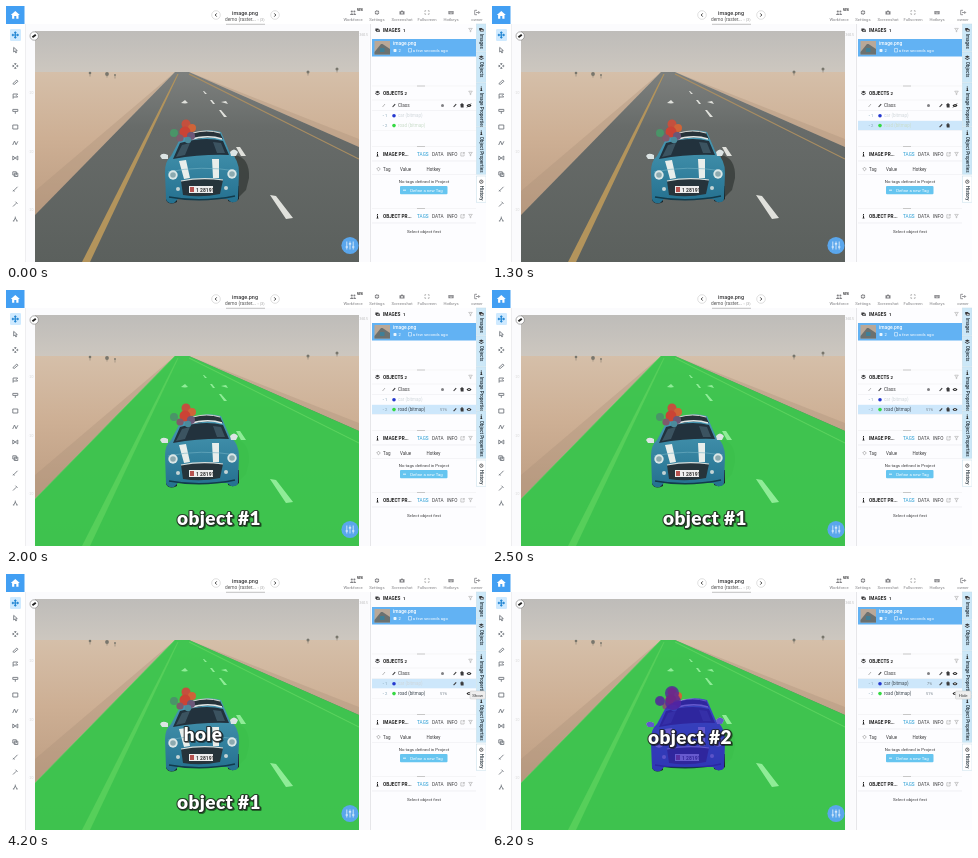
Write an HTML page that moves like this. It is 480x256 px and loops after 6.3 s.

```html
<!DOCTYPE html>
<html lang="en">
<head>
<meta charset="utf-8">
<title>Bitmap labeling</title>
<style>
  html, body { margin: 0; width: 100%; height: 100%; overflow: hidden; background: #fff; }
  svg { display: block; width: 100%; height: 100%; }
  text { font-family: Roboto, Arial, sans-serif; }
  .label { font: 900 19px Lato, "Open Sans", sans-serif; letter-spacing: .4px; fill: #fff; stroke: #222c; stroke-width: 2.2px;
    paint-order: stroke; stroke-linejoin: round; text-anchor: middle; filter: drop-shadow(1px 1.5px .7px #0009); }
</style>
</head>
<body>
<svg id="stage" viewBox="0 0 480 256" preserveAspectRatio="none">
  <defs>
    <linearGradient id="sky" x2="0" y2="1"><stop stop-color="#bebcb9"/><stop offset="1" stop-color="#cec8c0"/></linearGradient>
    <linearGradient id="sand" x2="0" y2="1"><stop stop-color="#d5bfa9"/><stop offset=".35" stop-color="#cdaf94"/><stop offset="1" stop-color="#b29176"/></linearGradient>
    <linearGradient id="asphalt" x2="0" y2="1"><stop stop-color="#7d807e"/><stop offset=".3" stop-color="#676b69"/><stop offset="1" stop-color="#5b605d"/></linearGradient>
    <linearGradient id="paint" x2="0" y2="1"><stop stop-color="#4b9bb5"/><stop offset="1" stop-color="#24708f"/></linearGradient>
    <clipPath id="frame"><path d="M29 25H353V256H29Z"/></clipPath>
    <path id="roadShape" d="M169 66H183L353 141V256H29V209Z"/>
    <path id="carShape" d="M187 127Q201 122 215 126L224 147Q233 153 233 167L232 193Q231 197 225 196L221 193H172L168 197Q161 198 160 193L159 166Q159 155 165 150L173 135Q178 128 187 127Z"/>
    <path id="mirrors" d="M154 150Q156 146 162 149V153H156ZM224 146Q228 141 232 146L230 150H225Z"/>
  </defs>
</svg>
<script>
const LOOP = 6300;
const stage = document.getElementById('stage');
const BLUE = '#429ff3', INK = '#3a3a3c', GRAY = '#808084', HOVER = '#cde7fb';

const attrs = o => Object.entries(o).map(([k, v]) => ` ${k}="${v}"`).join('');
const rect = (x, y, width, height, fill, more = {}) => `<rect${attrs({x, y, width, height, fill, ...more})}/>`;
const dot = (cx, cy, r, fill, more = {}) => `<circle${attrs({cx, cy, r, fill, ...more})}/>`;
const shape = (d, fill, more = {}) => `<path${attrs({d, fill, ...more})}/>`;
const line = (d, stroke = INK, width = .8) => shape(d, 'none', {stroke, 'stroke-width': width});
const text = (s, x, y, size = 4.5, fill = INK, more = {}) =>
  `<text${attrs({x, y, 'font-size': size, fill, ...more})}>${s}</text>`;
const at = (x, y, body) => `<g transform="translate(${x} ${y})">${body}</g>`;
const use = (id, more = {}) => `<use${attrs({href: '#' + id, ...more})}/>`;
const MID = {'text-anchor': 'middle'}, BOLD = {'font-weight': 700};

// Visible spans in ms; parts outside their spans are hidden.
const ROAD_ON = 1400, CAR_ON = 5300;
const SPANS = {
  roadMask: [[ROAD_ON, LOOP]], carMask: [[CAR_ON, LOOP]],
  roadPale: [[0, ROAD_ON]], roadOn: [[ROAD_ON, LOOP]],
  carPale: [[0, CAR_ON]], carOn: [[CAR_ON, LOOP]],
  roadHover: [[400, 3700]], carHover: [[3700, LOOP]],
  allHidden: [[0, ROAD_ON]],
  showRoad: [[600, 1200]], hideRoad: [[2700, 3600]],
  showCar: [[3900, 5000]], hideCar: [[5500, LOOP]],
  object1: [[1800, 4600]], hole: [[2700, 4600]], object2: [[6000, LOOP]]
};
const part = (id, body) => `<g id="${id}">${body}</g>`;

// Icons are drawn around their own centre.
const icon = {
  pencil: line('M-1.4 1.5L1.2-1.3', INK, 1.1),
  trash: shape('M-1.6-1.4H1.6V1.9H-1.2L-1.6-.8ZM-.7-2.3H.7V-1.4H-.7Z', INK),
  eye: shape('M-2.5 0Q0-3 2.5 0Q0 3-2.5 0Z', '#222') + dot(0, 0, .8, '#fff'),
  filter: line('M-1.8-1.6H1.8L.3.2V1.8H-.3V.2Z', '#aaa', .6),
  popout: line('M0-1.6H-1.7V1.7H1.6V0M0 0L1.8-1.8M.4-1.8H1.8V-.4', '#aaa', .6),
  people: dot(-1.2, -1, 1.1, GRAY) + dot(1.4, -1, 1, GRAY) + shape('M-3.2 2.4Q-1.2-.8.8 2.4ZM.9 2.4L.6 1Q2.2 0 3.2 2.4Z', GRAY),
  gear: dot(0, 0, 1.6, 'none', {stroke: GRAY, 'stroke-width': 1.4, 'stroke-dasharray': '1.2 .3'}),
  camera: shape('M-2.5-1.3H-1L-.6-2H.6L1-1.3H2.5V2H-2.5Z', GRAY) + dot(0, .3, .9, '#fff'),
  expand: line('M-2.1-.6V-1.8H-.9M.9-1.8H2.1V-.6M2.1.6V1.8H.9M-.9 1.8H-2.1V.6', '#999', .7),
  keys: rect(-2.6, -1.6, 5.2, 3.3, GRAY, {rx: .5}) + line('M-1.8-.4H1.8M-1.2.8H1.2', '#fff', .5),
  exit: line('M0-2.2H-2.3V2.2H0M-1 0H2.6M1.3-1.4L2.7 0L1.3 1.4', GRAY),
  tag: line('M0-1.8L1.8 0L0 1.8L-1.8 0Z', '#888', .6),
  cube: shape('M0-2.2L2.4-1L0 .3L-2.4-1ZM-2.4.1L0 1.3L2.4.1V.8L0 2.2L-2.4.8Z', INK),
  picture: shape('M-2.1-1.8H1V-.8H2.3V1.9H-1.2V.9H-2.1Z', INK) + shape('M-.8 1L.2-.1L.8.5L1.3 0L1.9 1Z', '#fff'),
  info: shape('M-.7-.8H.5V1.5H1V2.2H-1V1.5H-.5V-.1H-.7ZM-.5-2.2H.5V-1.3H-.5Z', '#222'),
  clock: dot(0, 0, 1.7, 'none', {stroke: INK, 'stroke-width': .7}) + line('M0-1V0H.8', INK, .6)
};
const put = (name, x, y) => at(x, y, icon[name]);

function car() {
  const balloons = [[180, 118, 4.5, '#c4503e'], [186, 122, 4, '#cf6438'], [168, 127, 4, '#4a9468'],
    [179, 126, 5.5, '#cb4335'], [185, 130, 4, '#6c5778'], [174, 132, 3.6, '#7f5a6c'], [182, 134, 3.2, '#4c8a9b']];
  return shape('M160 180H171V196Q163 200 160 194ZM222 180H233V193Q229 198 222 195Z', '#1b2225')
    + use('carShape', {fill: 'url(#paint)'}) + use('mirrors', {fill: '#dce4e4'})
    + shape('M187 127Q201 123 214 127L217 133Q201 129 182 135Z', '#27333a')
    + line('M183 134Q201 128 216 133', '#e1e8e7', 1.5) + line('M187 127Q201 123 214 127', '#d5d3ce', 1)
    + shape('M174 137Q199 130 217 135L223 149Q196 148 167 153Z', '#22323d')
    + shape('M176 139L184 137L179 149L170 151ZM207 136L215 137L219 147L211 147Z', '#466270', {opacity: .7})
    + shape('M173 155L180 154L184 172L178 173ZM206 153L213 153L213 172L207 172Z', '#e9eeeb')
    + line('M162 166Q194 159 231 165', '#75b3c4', .6)
    + [[167, 169], [226, 168]].map(([x, y]) => dot(x, y, 4.7, '#dbe7e7') + dot(x, y, 2.8, '#8caab0')).join('')
    + shape('M175 175Q195 171 217 174L214 188Q195 192 177 189Z', '#26343b')
    + line('M175 175Q195 171 217 174', '#d6dedc', 1.2)
    + rect(183, 180, 24, 7, '#eee') + rect(184, 181, 4, 5, '#b65350')
    + text('1 28191', 190, 185.8, 5, '#333', BOLD)
    + dot(172, 183, 2, '#c4d4d5') + dot(220, 182, 2, '#c4d4d5')
    + line('M163 191Q195 197 229 190', '#123a4b', 1.4)
    + balloons.map(b => dot(...b)).join('');
}

function photo() {
  const trees = [[84, 67, 1.3], [101, 68, 1.9], [109, 69, .9], [302, 66, 1.5], [331, 63, 1.5]];
  const leftLine = 'M171.5 68L172.5 68L84 256H76Z', rightLine = 'M183 68L353 153';
  const dashes = 'M264 189L270 190L287 212L280 213ZM230 141L234 141L240 150L235 150ZM213 104L215 104L221 111L218 111ZM204 94H206L209 98H207ZM197 85H198L201 88H199Z';
  const arrows = 'M175 97L179 94L182 97L179 97.6ZM215 96L220 95L222 98Z';
  return `<g clip-path="url(#frame)">`
    + rect(29, 25, 324, 45, 'url(#sky)') + rect(29, 66, 324, 190, 'url(#sand)')
    + trees.map(([x, y, r]) => dot(x, y, r, '#77756c') + line(`M${x} ${y}v3.5`, '#857c70', .6)).join('')
    + shape('M169 66L29 185V209ZM183 66L353 133V141Z', '#a88f79', {opacity: .35})
    + use('roadShape', {fill: 'url(#asphalt)'})
    + shape('M229 149Q244 152 243 172L240 184L229 195Z', '#303633', {opacity: .7})
    + shape(leftLine, '#b3945c') + line(rightLine, '#ad8f60', 1.1)
    + shape(dashes + arrows, '#e0e1dc')
    + part('roadMask', use('roadShape', {fill: '#3ccb4e', opacity: .92})
      + shape(leftLine, '#62d463', {opacity: .6})
      + line(rightLine + 'M169 66L29 209', '#66d968', .7) + shape(dashes + arrows, '#8fec97'))
    + car()
    + part('carMask', `<g fill="#3422c4" opacity=".72">${use('carShape')}${use('mirrors')}</g>`
      + `<g fill="#54219f" opacity=".78">${dot(180, 119, 7, 'inherit')}${dot(168, 127, 5, 'inherit')}${dot(181, 128, 8, 'inherit')}</g>`)
    + '</g>';
}

function topBar() {
  const menu = [['people', 'Workforce', 347], ['gear', 'Settings', 371], ['camera', 'Screenshot', 396],
    ['expand', 'Fullscreen', 421], ['keys', 'Hotkeys', 445], ['exit', 'owner', 471]];
  const arrow = (x, s) => dot(x, 9, 4.3, '#fff', {stroke: '#ccc', 'stroke-width': .6}) + line(`M${x - s * .7} 7.4L${x + s * .8} 9L${x - s * .7} 10.6`, '#333', .9);
  return rect(0, 0, 480, 18, '#fff') + rect(0, 0, 18.5, 18, BLUE)
    + shape('M4.8 9L9.3 5L13.8 9H12.5V12.8H10.3V10H8.3V12.8H6.1V9Z', '#fff')
    + arrow(210, -1) + arrow(269, 1)
    + text('image.png', 239, 8.7, 5.5, INK, {...MID, 'font-weight': 500})
    + text('demo (raster...', 219, 15.4, 4.8, '#555') + text('▫ (3)', 251.5, 15.2, 3.8, '#999')
    + line('M220 18.3H259', '#aaa', .7)
    + menu.map(([name, label, x]) => put(name, x, 6.5) + text(label, x, 15.3, 4.2, GRAY, MID)).join('')
    + text('NEW', 351, 4.7, 2.7, INK, BOLD);
}

function toolbar() {
  const tools = [[29, 'M-3 0H3M0-3V3M-2-1L-3 0L-2 1M2-1L3 0L2 1M-1-2L0-3L1-2M-1 2L0 3L1 2'],
    [44, 'M-1.6-2.6V2L-.4 1L.6 3L1.3 2.6L.4.8L2 .6Z'], [60, 'M-2.4-.8V.8L-1.2 0ZM2.4-.8V.8L1.2 0ZM-.8-2.4H.8L0-1.2ZM-.8 2.4H.8L0 1.2Z'],
    [76, 'M-2.5 1.7L1.5-2L2.6-.6L-1 2.4Z'], [90, 'M-2.2-2V2.7M-2.2-2H2.4L1-.5L2.4 1H-2.2'],
    [105, 'M-2.5-1.6H2.5V.4H-2.5ZM0 .4V2.8'], [121, 'M-2.5-2H2.5V2H-2.5Z'],
    [137, 'M-2.6 2L-.8-2L.8 1.8L2.6-1.7'], [152, 'M-2.5-2L2.5 2M2.5-2L-2.5 2M-2.5-2V2M2.5-2V2'],
    [168, 'M-2.5-2.2H1V1H-2.5ZM-1-.8H2.5V2.5H-1Z'], [183, 'M-2.2 2.3L2.2-2.2M-2.4 1.2L-.8 2.4'],
    [198, 'M-2.3 2.5L1 -.8M.2-2.3L2.2-.3'], [213, 'M0-2.4V-.8M-2.4 2H-1M1 2H2.4M0-1L-1.7 2M0-1L1.7 2']];
  return rect(0, 18, 19.5, 238, '#fff') + line('M19.5 18V256', '#e2e2e6', .6)
    + rect(4, 23, 11, 12, '#cfeaff', {rx: 1.2})
    + tools.map(([y, d], i) => at(9.3, y, line(d, i ? '#747a80' : '#2286d3', i ? .9 : 1.1))).join('');
}

const section = (name, title, y) => put(name, 371.5, y - 1.8) + text(title, 377, y, 4.7, '#222', BOLD) + put('filter', 464.5, y - 2);

function propertySection(title, y) {
  return section('info', title, y) + put('popout', 456.5, y - 1.7)
    + text('TAGS', 411, y, 4.7, '#219ad2') + text('DATA', 426, y, 4.7) + text('INFO', 441, y, 4.7)
    + line(`M366 ${y + 5}H470`, '#e9e9ec', .6);
}

function objectRow(name, label, y, color, percent, n) {
  const pale = name === 'car' ? '#cfd6da' : '#c9dcc9';
  return part(name + 'Hover', rect(366, y - 4.8, 104, 9.4, HOVER) + put('pencil', 449, y) + put('trash', 456, y))
    + dot(388, y, 1.8, color) + text('• ' + n, 376.5, y + 1.5, 4.1, '#86a5b7')
    + part(name + 'Pale', text(label, 392, y + 1.5, 4.5, pale))
    + part(name + 'On', text(label, 392, y + 1.5, 4.5, '#3d4851') + text(percent, 437.5, y + 1.4, 3.9, '#75818a', MID) + put('eye', 463, y));
}

function panel() {
  const grip = y => line(`M366 ${y}H470`, '#f0f0f2', .6) + line(`M411 ${y}H419`, '#bbb', .8);
  return rect(363.5, 18, 106.5, 238, '#fdfdff') + line('M364.5 18V256', '#e0e0e4', .8)
    + section('picture', 'IMAGES', 26) + text('1', 397, 25.8, 4.3, '#222', BOLD)
    + rect(366, 33, 104, 17.5, '#62b2f3')
    + rect(368.5, 35, 15.5, 13.5, '#b9a898') + shape('M375 38H376.5L384 43V48.5H368.5V46Z', '#6b7170') + rect(374, 42, 4.5, 4, '#3f7f97')
    + text('image.png', 387, 39.4, 4.9, '#fff', {'font-weight': 500})
    + rect(387.5, 43, 3, 3, '#e7f5ff', {rx: .7}) + text('2', 392.5, 46.2, 4.2, '#fff')
    + line('M402.5 42.5H405.5V46H402.5Z', '#e4f4ff', .6) + text('a few seconds ago', 406.8, 46.2, 4.2, '#fff')
    + grip(80)
    + section('cube', 'OBJECTS', 88.8) + text('2', 398.5, 88.6, 4.3, '#222', BOLD)
    + line('M366 94H470M366 104.5H470', '#ebebee', .5)
    + line('M376.5 101L379 98', '#999', .7) + put('pencil', 388, 99.5) + text('Class', 392, 101.2, 4.7)
    + dot(436.5, 99.5, 1.5, GRAY) + put('pencil', 449, 99.5) + put('trash', 456, 99.5) + put('eye', 463, 99.5)
    + part('allHidden', line('M461 101.5L465 97.5', '#222', .8))
    + objectRow('car', 'car (bitmap)', 109.7, '#2438cf', '7%', 1)
    + objectRow('road', 'road (bitmap)', 119.6, '#35d943', '51%', 2)
    + line('M366 124.5H470', '#f0f0f2', .5) + grip(140.5)
    + propertySection('IMAGE PR...', 150)
    + put('tag', 372.5, 163) + text('Tag', 377, 164.7) + text('Value', 394, 164.7) + text('Hotkey', 420.5, 164.7)
    + line('M366 168.5H470', '#ebebee', .5)
    + text('No tags defined in Project', 418, 176.5, 4.4, INK, MID)
    + rect(394, 180, 47.5, 8.2, '#66c5f0', {rx: 1}) + line('M397 184.2H400', '#fff', .8)
    + text('Define a new Tag', 420.5, 185.8, 4.3, '#fff', MID)
    + grip(202.5) + propertySection('OBJECT PR...', 212)
    + text('Select object first', 418, 226.7, 4.4, INK, MID);
}

function sideTabs() {
  const tabs = [['picture', 'Images', 18, 28], ['cube', 'Objects', 46, 31], ['info', 'Image Properties', 77, 44],
    ['info', 'Object Properties', 121, 48], ['clock', 'History', 170, 27]];
  return rect(470, 18, 10, 238, '#fdfdff')
    + tabs.map(([name, label, y, h], i) => rect(470.5, y, 9.5, h - .8, i < 4 ? '#cce8f8' : '#fff', {stroke: '#c2dbe8', 'stroke-width': .5})
      + put(name, 475.3, y + 5.7) + `<g transform="translate(473.7 ${y + 9.7}) rotate(90)">${text(label, 0, 0, 4.6, '#25323b', {'font-weight': 500})}</g>`).join('');
}

const tip = (id, label, x, y) => part(id, rect(x, y, 15.5, 8, '#eee', {rx: 1, stroke: '#bbb', 'stroke-width': .4}) + text(label, x + 7.7, y + 5.5, 4.4, INK, MID));
const label = (id, s, x, y) => part(id, text(s, x, y, 19, '#fff', {class: 'label'}));

function canvasTools() {
  return dot(28.2, 30, 4.2, '#fff', {stroke: '#777', 'stroke-width': .6}) + at(28.2, 30, line('M-1.8 1.3L1.6-1.2', '#222', 2))
    + dot(344, 239.5, 8.6, '#5aa6ec')
    + line('M340.8 235.5V243.5M344 235.5V243.5M347.2 235.5V243.5', '#e6f2fd', .8)
    + line('M339.6 241H342M342.8 237.8H345.2M346 241H348.4', '#e6f2fd', 1.2);
}

stage.innerHTML += rect(19.5, 18, 345, 238, '#fbfbfd')
  + [88, 147, 205].map(y => text('·20', 22.5, y, 3.5, '#d8d8d8')).join('') + text('360.5', 353.5, 30, 3.4, '#bbb')
  + photo() + canvasTools() + topBar() + toolbar() + panel() + sideTabs()
  + tip('showRoad', 'Show', 462, 125) + tip('hideRoad', 'Hide', 462, 125)
  + tip('showCar', 'Show', 464, 117) + tip('hideCar', 'Hide', 463.5, 117)
  + label('object1', 'object #1', 213, 235) + label('hole', 'hole', 197, 166.5) + label('object2', 'object #2', 198, 170);

for (const [id, spans] of Object.entries(SPANS)) {
  const visible = t => spans.some(([from, to]) => t >= from && t < to) ? 1 : 0;
  const times = [...new Set([0, ...spans.flat(), LOOP])].sort((a, b) => a - b);
  const frames = times.map(t => ({offset: t / LOOP, opacity: visible(Math.min(t, LOOP - 1)), easing: 'step-end'}));
  document.getElementById(id).animate(frames, {duration: LOOP, iterations: Infinity});
}
</script>
</body>
</html>
```
